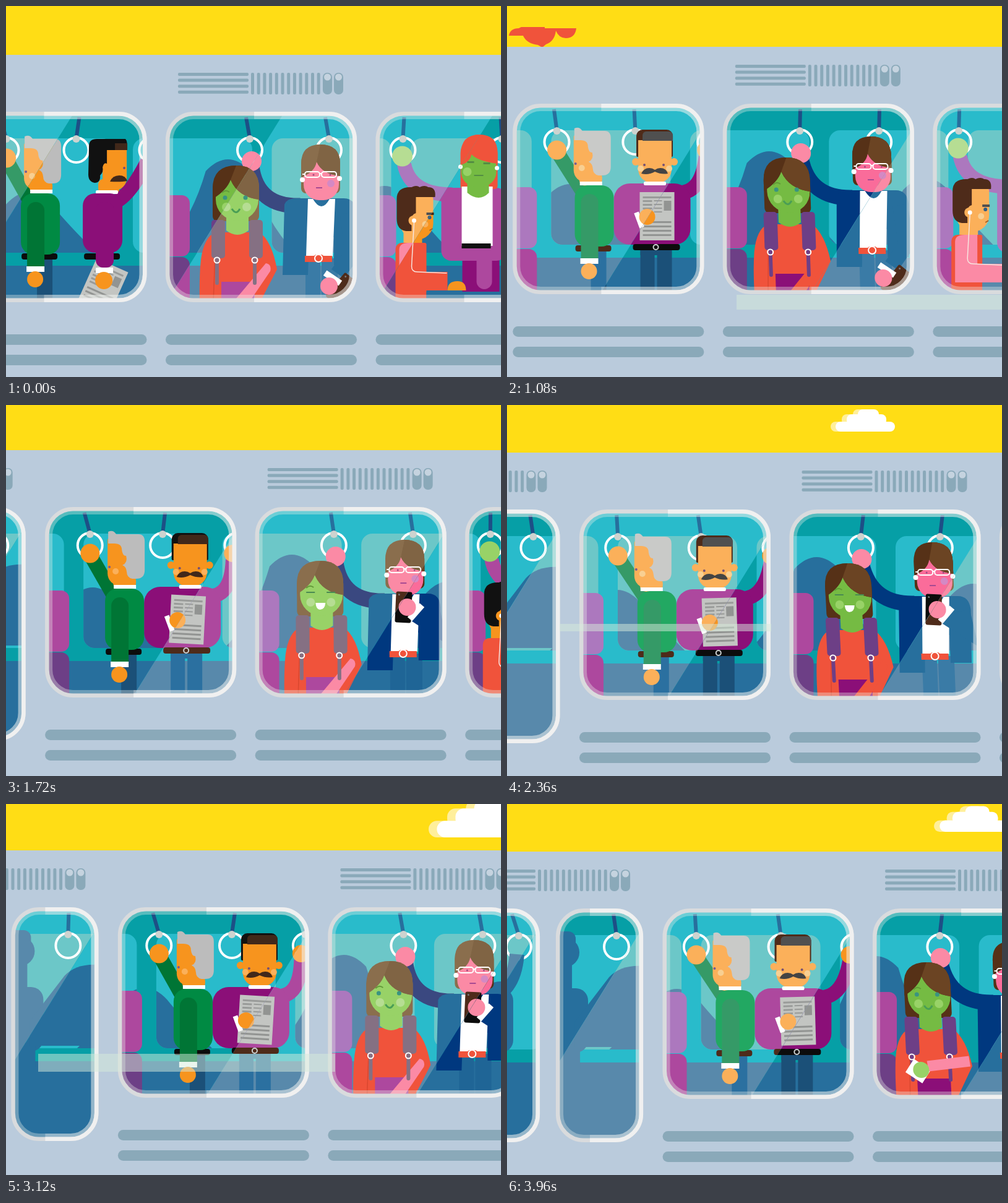
Recreate the animation shown at these times as an HTML page with a canvas. Size 800x600 px, loop 4 s.

```html
<!DOCTYPE html>
<html>
<head>
<meta charset="utf-8">
<style>
html, body { margin: 0; width: 800px; height: 600px; overflow: hidden; }
canvas { display: block; }
</style>
</head>
<body>
<canvas id="stage" width="800" height="600"></canvas>
<script>
const g = document.getElementById('stage').getContext('2d');

// Every colour pair is [in shade, in light].
const tones = {
  wall: ['#069fa6', '#29bbcb'], pane: ['#29bbcb', '#6cc7c8'],
  floor: ['#276f9d', '#5889ab'], hill: ['#276f9d', '#5889ab'],
  jeans: ['#1b5078', '#2b70a0'], slacks: ['#1f6596', '#3a7ba6'],
  strap: ['#1d4f86', '#276f9d'], silhouette: ['#276f9d', '#5889ab'],
  seat: ['#ad489e', '#ac78be'], seatLow: ['#6d3f86', '#ad489e'],
  sweater: ['#008a43', '#22a862'], sleeve: ['#007535', '#359a67'],
  plum: ['#8b0f78', '#ad489e'], jacket: ['#ad489e', '#ac78be'],
  skin: ['#f7941e', '#fbb05a'], blush: ['#fbb05a', '#f8cf92'],
  grey: ['#bcbcbc', '#c9cac8'], black: ['#111111', '#4e2b1a'],
  front: ['#41281a', '#505050'], tache: ['#41281a', '#444444'],
  belt: ['#0c0c0c', '#4e2b1a'],
  hair: ['#563117', '#8a6e4d'], fringe: ['#6b4423', '#806444'],
  green: ['#75bb43', '#98d267'], mint: ['#98d267', '#b6dd93'],
  pack: ['#6d3f86', '#857083'], suit: ['#00387f', '#276f9d'],
  suitArm: ['#00387f', '#3a4880'], pink: ['#fa6c9a', '#fb8aa5'],
  cuffArm: ['#f0533b', '#fb8aa5']
};
const rose = '#fb8aa5', red = '#f0533b';
let lit = 0;
const tone = c => tones[c] ? tones[c][lit] : c;

function box(c, x, y, w, h, r = 0) {
  g.fillStyle = tone(c);
  g.beginPath(); g.roundRect(x, y, w, h, r); g.fill();
}
function dot(c, x, y, r) {
  g.fillStyle = tone(c);
  g.beginPath(); g.arc(x, y, r, 0, 7); g.fill();
}
function shape(c, d) { g.fillStyle = tone(c); g.fill(new Path2D(d)); }
function line(c, width, d) {
  g.strokeStyle = tone(c); g.lineWidth = width;
  g.stroke(new Path2D(d));
}
function outline(c, width, x, y, w, h, r) {
  g.strokeStyle = tone(c); g.lineWidth = width;
  g.beginPath(); g.roundRect(x, y, w, h, r); g.stroke();
}
const ringLine = (c, width, x, y, r) => outline(c, width, x - r, y - r, 2 * r, 2 * r, r);
function group(draw) { g.save(); draw(); g.restore(); }
function placed(x, y, angle, draw) {
  group(() => { g.translate(x, y); g.rotate(angle); draw(); });
}
function leaning(k, base, draw) {
  group(() => { g.transform(1, 0, -k, 1, k * base, 0); draw(); });
}
const mix = (a, b, p) => a + (b - a) * p;
const ease = (t, a, b) => {
  const p = Math.min(1, Math.max(0, (t - a) / (b - a)));
  return p * p * (3 - 2 * p);
};

const bumps = [[0, 0], [640, -8], [1080, -13], [1720, -6], [2360, -2], [3120, -4], [3960, -2], [4001, -1]];
function bounce(t) {
  const i = bumps.findIndex((b, n) => t < bumps[n + 1][0]);
  const [a, b] = [bumps[i], bumps[i + 1]];
  return mix(a[1], b[1], ease(t, a[0], b[0]));
}

function handle(top, x) {
  line('strap', 6, `M${top} 180 L${x} 214`);
  ringLine('#ffffff', 4, x, 233, 20);
  dot('#cdd3cf', x, 215, 6);
}
function seats(w) {
  box('seat', -10, 306, w + 10, 99, 13);
  box('seatLow', -10, 406, w + 10, 80, 13);
}

function newspaper(x, y, angle) {
  placed(x, y, angle, () => {
    box('#c3c5c2', -28, -39, 56, 78);
    for (let i = 0; i < 6; i++) box('#999b99', -23, -32 + i * 6, i < 1 ? 46 : 15, 3);
    for (let i = 1; i < 5; i++) box('#999b99', -5, -32 + i * 6, 13, 2);
    box('#929492', 11, -25, 12, 16);
    for (let i = 0; i < 4; i++) box('#929492', -23, 8 + i * 7, 46, 3);
  });
}

function oldMan(handX, nod) {
  box('jeans', 116, 404, 25, 75);
  box('belt', 91, 400, 58, 10, 4);
  line('sleeve', 23, `M${handX} 248 L108 322`);
  group(() => {
    g.translate(nod, 0);
    box('skin', 104, 280, 37, 24, 10);
    box('skin', 95, 222, 48, 76, [3, 3, 32, 22]);
    dot('skin', 131, 262, 7);
    shape('grey', 'M96 211 q8-4 13 4 h36 q10 0 10 12 v46 q0 14-14 14 h-6 q-9-2-9-11 q-1-9-7-11 q9-4 6-15 q-6 0-7-10 q0-10-12-10 h-10z');
    dot('#765b94', 98, 268, 2);
    dot('blush', 108, 275, 5);
    box('#ffffff', 105, 297, 36, 6);
  });
  box('sweater', 90, 303, 63, 99, 20);
  box('sleeve', 100, 317, 28, 106, [14, 14, 0, 0]);
  box('#ffffff', 99, 421, 29, 9);
  dot('skin', 113, 442, 13);
  dot('skin', handX, 246, 15.5);
}

function reader(t, c, handX) {
  const p = ease(t, 300, 900);
  box('jeans', 196, 404, 23, 75);
  box('jeans', 223, 404, 24, 75);
  box('jeans', 196, 404, 50, 12);
  line('plum', 23, `M250 314 Q294 322 ${handX} 256`);
  box('plum', 153, 300, 124, 99, 26);
  dot('skin', handX, 246, 14);
  box('belt', 184, 398, 76, 10, 4);
  ringLine('#ccd0d0', 2, 221, 403, 4);
  group(() => {
    g.translate(7 * (c - 1), 0);
    dot('skin', 198, 265, 6); dot('skin', 260, 265, 6);
    box('black', 199, 213, 59, 44, [10, 10, 2, 2]);
    box('skin', 202, 230, 54, 69, [0, 0, 22, 22]);
    box('front', 209, 216, 49, 15, [6, 6, 0, 0]);
    dot('#755074', 212, 270, 2); dot('#755074', 243, 270, 2);
    dot('blush', 206, 276, 5); dot('blush', 252, 276, 5);
    shape('tache', 'M207 284 q4-9 13-9 q5 0 9 3 q4-3 9-3 q9 0 12 9 q-10 2-21-3 q-11 6-22 3z');
    box('#ffffff', 211, 297, 36, 6, 2);
  });
  const y = mix(422, 353, p);
  newspaper(mix(236, 223, p), y, mix(.55, .015 + .045 * c, p));
  placed(194, y + 6, -.35, () => box('#ffffff', -4, -13, 8, 26));
  dot('skin', 207, y + 1, 13);
}

function readerInProfile() {
  newspaper(222, 455, .42);
  box('belt', 192, 400, 58, 10, 4);
  line('plum', 23, 'M240 318 Q264 310 294 252');
  box('skin', 215, 280, 34, 24, 8);
  box('skin', 222, 218, 39, 80, [4, 6, 24, 24]);
  shape('black', 'M200 226 q0-11 13-11 h46 q4 4 2 18 h-32 v22 q-5-3-7 6 q2 7-4 13 q1 12-9 12 q-11-2-10-16z');
  box('front', 242, 222, 20, 11);
  dot('#755074', 257, 262, 2);
  shape('tache', 'M234 284 q4-10 15-10 q10 0 13 9 q-10 2-28 1z');
  box('#ffffff', 211, 298, 36, 6, 2);
  box('plum', 190, 303, 64, 96, 20);
  box('plum', 211, 317, 29, 106, 12);
  box('#ffffff', 211, 423, 28, 9);
  dot('skin', 224, 444, 14);
}

function standingMen(t, c) {
  const drift = -.005 * (t - 3120);
  const lastRing = 322 - .0045 * t - 5 * c;
  seats(39);
  handle(72 - .005 * t, 78 - .005 * t + 4 * c);
  handle(200 - .0035 * t, 200 - .0035 * t - 5 * c);
  handle(318 - .0045 * t, lastRing);
  g.translate(drift, 0);
  if (t < 320) readerInProfile(); else reader(t, c, lastRing - 7 - drift);
  oldMan(62.5 + 4 * c, 5 * (c - 1));
}

function backpacker(t) {
  const laughing = t > 1400 && t < 2740;
  box('hair', 76, 258, 75, 90, [37, 37, 8, 8]);
  shape(red, 'M80 366 q-18 8-23 44 q-3 30-2 70 h97 l28-54 q-8-45-28-60z');
  shape('plum', 'M90 446 h54 v34 h-54z');
  line('#d9472f', 1.5, 'M80 400 L77 480 M146 400 V440');
  if (t < 3500) shape('cuffArm', 'M162 416 q10 2 7 13 l-34 50 h-26z');
  shape('green', 'M98 336 h36 v27 q-18 14-36 0z');
  box('green', 81, 270, 69, 77, 34);
  shape('hair', 'M76 312 v-17 q0-37 38-37 q37 0 37 37 v18 q-34-4-46-32 q-6 17-29 31z');
  shape('fringe', 'M105 281 q12 28 46 32 v-18 q0-37-37-37z');
  for (const x of [98, 131]) {
    dot('mint', x, 325, 7);
    if (laughing) line('#4a8a52', 2, `M${x - 7} 309 h14`);
    else dot('#3a9480', x - 2, 310, 3.5);
  }
  line('#629a38', 2, 'M91 302 q6-6 12-1');
  if (laughing) shape('#ffffff', 'M106 326 h16 q-1 11-9 11 q-6 0-7-11z');
  else line('#4a9e55', 3, 'M107 328 q7 11 13 0');
  for (const x of [74, 135]) {
    box('pack', x, 346, 22, 62, 5);
    box('pack', x + 6, 405, 6, 46, 3);
    ringLine('#ffffff', 2, x + 9, 411, 4.5);
  }
  if (t >= 3500) {
    placed(92, 434, .6, () => box('#ffffff', -16, -13, 32, 26));
    line(rose, 17, 'M176 418 L108 426');
    dot('mint', 97, 432, 13);
  }
}

function suitedMan(t, handX) {
  const p = ease(t, 1180, 1620);
  box('slacks', 226, 408, 24, 75); box('slacks', 252, 408, 26, 75);
  line('suitArm', 25, `M${handX} 260 Q148 325 218 323`);
  box('pink', 238, 300, 27, 30, 12);
  shape('suit', 'M192 321 q4-10 18-10 h78 q18 0 20 22 l-2 86 h-34 v-45 h-40 l-2 61 h-41z');
  shape('#ffffff', 'M230 312 h8 q14 24 27 0 h9 l-4 93 h-43z');
  box(red, 225, 404, 44, 10);
  box(red, 239, 402, 17, 12, 5);
  ringLine('#ffffff', 2, 247, 408, 6);
  box('hair', 219, 224, 63, 79, [31, 31, 8, 8]);
  box('pink', 223, 248, 57, 66, [20, 20, 25, 25]);
  shape('hair', 'M219 277 v-22 q0-31 31-31 q32 0 32 31 v20 q-29-3-38-23 q-3 17-25 25z');
  shape('fringe', 'M244 252 q9 20 38 23 v-20 q0-31-32-31z');
  for (const x of [225, 252]) {
    outline('#ffffff', 2, x, 268, 24, 9, 4);
    dot('#a04a80', x + 14, 273, 1.5);
  }
  line('#ffffff', 2, 'M249 271 h4 M221 272 h4');
  dot('#ffffff', 221, 281, 4); dot('#ffffff', 281, 279, 4);
  dot('#d489c4', 267, 287, 6);
  line('#a74a92', 2, 'M243 294 h10');
  // The right arm lifts the phone to the chest.
  const x = mix(264, 254, p), y = mix(453, 333, p);
  line('suit', 25, `M294 335 L${mix(302, 300, p)} ${mix(400, 366, p)} L${x + 14} ${y + mix(-20, 12, p)}`);
  placed(mix(284, 248, p), mix(458, 333, p), mix(.7, .05, p), () => {
    box('belt', -13, -25, 26, 50, 3);
    dot('#777', -8, -20, 1.5);
  });
  placed(x + mix(6, 14, p), y - mix(13, -8, p), mix(.6, -.85, p), () => box('#ffffff', -15, -5, 30, 10));
  dot(rose, x, y, 14);
  dot(rose, handX, 251, 16);
}

function phoneAndBackpack(t, c) {
  seats(39);
  handle(130 - .0045 * t, 131 - .0045 * t + 5 * c);
  handle(258 - .0045 * t, 259 - .0045 * t + 5 * c);
  g.translate(-.0045 * t, 0);
  leaning(.02 * (c - 1), 440, () => suitedMan(t, 139 - 2 * (1 - c)));
  leaning(.025 * (c - 1), 450, () => backpacker(t));
}

function commuters(t, c) {
  seats(33);
  handle(46 - .003 * t, 44 - .002 * t);
  handle(202 - .003 * t, 200 - .003 * t + 4 * c);
  g.translate(-.002 * t, 0);
  // standing
  box('plum', 140, 388, 60, 95);
  box('jacket', 163, 392, 25, 66, 14);
  line('jacket', 23, 'M46 256 Q56 305 124 305');
  dot('mint', 43, 243, 16.5);
  box('jacket', 106, 294, 105, 118, 16);
  box(red, 137, 208, 60, 88, [30, 30, 5, 5]);
  box('#ffffff', 139, 292, 50, 96);
  box('#111111', 139, 384, 47, 8);
  shape('green', 'M148 278 h35 v24 q-16 16-35 0z');
  box('green', 138, 236, 57, 56, 24);
  shape(red, 'M138 257 v-19 q0-30 30-30 q29 0 29 30 v17 q-32-4-42-15 q-3 13-17 17z');
  box('#548e43', 148, 251, 11, 3); box('#548e43', 174, 253, 11, 3);
  line('#548e43', 2, 'M159 274 h15');
  dot('mint', 148, 268, 7);
  dot('#ffffff', 137, 260, 3.5); dot('#ffffff', 196, 262, 3.5);
  // seated
  box('skin', 40, 307, 53, 71, [5, 5, 28, 28]);
  shape('black', 'M34 312 q0-20 24-19 q8-4 13 0 q8-4 14 0 q13 0 11 16 h-31 v26 q-8 2-7 13 v16 h-9 q-15-2-15-20z');
  dot('skin', 61, 347, 8);
  box('front', 82, 334, 12, 4); dot('#2d5d86', 87, 342, 3);
  dot('blush', 80, 353, 5);
  line('#a45c23', 2, 'M87 363 l5-3');
  box('skin', 45, 366, 30, 22);
  box(red, 32, 383, 50, 100, [10, 3, 0, 0]);
  shape('cuffArm', 'M38 394 q0-11 16-11 h20 v47 h42 v30 h-78z');
  shape('skin', 'M116 460 q0-15 16-15 q14 0 14 15z');
  box('floor', 82, 462, 130, 20);
  line('#f7e5df', 1.5, 'M62 350 l-4 71 q0 9 9 9 l48 2');
  dot('#ffffff', 62, 347, 3.5);
}

function rider(x, arm) {
  dot('silhouette', x, 242, 24);
  box('silhouette', x - 24, 208, 42, 55, 12);
  box('silhouette', x - 12, 260, 24, 45);
  box('silhouette', x - 38, 300, 76, 104, 20);
  box('silhouette', x - 20, 390, 45, 40);
  if (arm) line('silhouette', 24, `M${arm} 245 Q${arm - 5} 310 ${x - 10} 318`);
}

const scenes = {
  door1(t, c) {
    handle(96, 104 - 3 * c);
    rider(60, 104);
  },
  door2(t, c) {
    rider(14);
    shape('silhouette', 'M30 395 V355 L86 282 Q105 262 140 264 V395z');
    handle(93, 95 - 3 * c);
  },
  men: standingMen, pair: phoneAndBackpack, commuters
};

function interior(name, x, offset, t, c) {
  box('wall', 0, 170, 310, 380);
  group(() => {
    g.beginPath();
    for (let n = -4; n < 6; n++) g.roundRect(62 + n * 224.5 - offset - 339.5, 214, 193, 185, 18);
    g.fillStyle = tone('pane'); g.fill(); g.clip();
    const move = .06 * (t - 1720) - x;
    for (const [peak, top] of [[140, 300], [462, 247], [715, 290]]) {
      const m = peak + move;
      shape('hill', `M${m - 110} 400 Q${m - 60} 350 ${m - 36} ${top + 20} Q${m} ${top - 18} ${m + 36} ${top + 20} Q${m + 60} 350 ${m + 110} 400z`);
    }
  });
  box('floor', 0, 420, 310, 140);
  group(() => scenes[name](t, c));
}

function carWindow(name, X, offset, t, c, inverse) {
  const door = name.startsWith('door');
  const [w, h] = door ? [141, 378] : [309, 308];
  const x = X + offset;
  if (x > 800 || x + w < 0) return;
  // A slanted glare edge splits the glass; it starts further left, with light on its right.
  const early = t < 860;
  const edge = door ? 160 : early ? 193 : 333;
  const leftLit = (c < 0) !== (inverse !== early);
  const paint = state => { lit = +state; interior(name, x, offset, t, c); };
  const clipRightOf = (top, bottom) => {
    g.beginPath();
    for (const p of [[top, 165], [420, 165], [420, 560], [bottom, 560]]) g.lineTo(...p);
    g.clip();
  };
  const rim = (color, inner) => {
    outline(inner, 6, 9, 180, w - 18, h - 18, 36);
    outline(color, 6.5, 3.2, 174.2, w - 6.4, h - 6.4, 42);
  };
  group(() => {
    g.translate(x, 0);
    group(() => {
      g.beginPath(); g.roundRect(5, 176, w - 10, h - 10, 39); g.clip();
      paint(leftLit);
      clipRightOf(edge + 3, edge - 242);
      paint(!leftLit);
    });
    rim('#d9dbdd', 'rgba(235,240,235,.35)');
    const split = door ? 55 : 143;
    clipRightOf(split, split);
    rim('#f0f0f0', 'rgba(240,242,240,.3)');
  });
}

const grille = '#8aa9b9';
function topVent(x) {
  for (let i = 0; i < 4; i++) box(grille, x, 108 + i * 9.6, 114, 5, 2);
  for (let i = 0; i < 12; i++) box(grille, x + 118 + i * 9.7, 108, 5, 35, 2);
  for (const dx of [234, 252]) {
    box(grille, x + dx, 108, 15, 35, 7);
    dot('#c5d3df', x + dx + 7.5, 115, 5.5);
  }
}

function cloud(x, bottom, s) {
  group(() => {
    g.translate(x, bottom); g.scale(s, s);
    for (const [c, dx] of [['#ffef9b', 0], ['#ffffff', 8]]) {
      box(c, dx, -16, 96, 16, 8);
      box(c, dx + 18, -28, 64, 18, 8);
      box(c, dx + 36, -36, 34, 20, 8);
    }
  });
}

function draw(t) {
  const c = Math.cos(2 * Math.PI * t / 1560);
  const X = 258 + .0841 * t;
  box('#ffdd15', 0, 0, 800, 600);
  cloud(523 - 1.2 * (t - 2360), 43, 1);
  cloud(683 - 1.2 * (t - 3120), 54, 1.67);
  cloud(690 - 1.2 * (t - 3960), 45, 1.15);
  group(() => {
    g.translate(-2 * (t - 1080), 0);
    shape(red, 'M3 48 q2-12 16-12 l4-2 h38 v2 h51 q-2 16-17 16 q-11 0-16-12 q-2 17-16 22 l-6 5 l-7-4 q-18-2-24-15z');
  });
  group(() => {
    g.translate(0, bounce(t));
    box('#bacbdc', 0, 79, 800, 560);
    topVent(X + 20);
    topVent(X - 659);
    for (const offset of [-339.5, 0, 339.5])
      for (const y of [531, 564]) box(grille, X + offset, y, 309, 17, 8.5);
    carWindow('door1', X, -679, t, c, false);
    carWindow('door2', X, -512, t, c, true);
    carWindow('men', X, -339.5, t, c, false);
    carWindow('pair', X, 0, t, c, true);
    carWindow('commuters', X, 339.5, t, c, false);
  });
  // foreground streaks rushing past
  for (const [at, x, y, w, h] of [[1080, 371, 467, 430, 24], [2360, 85, 354, 342, 12], [3120, 52, 404, 480, 29]])
    box('rgba(215,235,220,.5)', x - 3 * (t - at), y, w, h);
}

function tick() {
  draw(Math.floor(performance.now() % 4000 / 40) * 40);
  requestAnimationFrame(tick);
}
tick();
</script>
</body>
</html>
```
